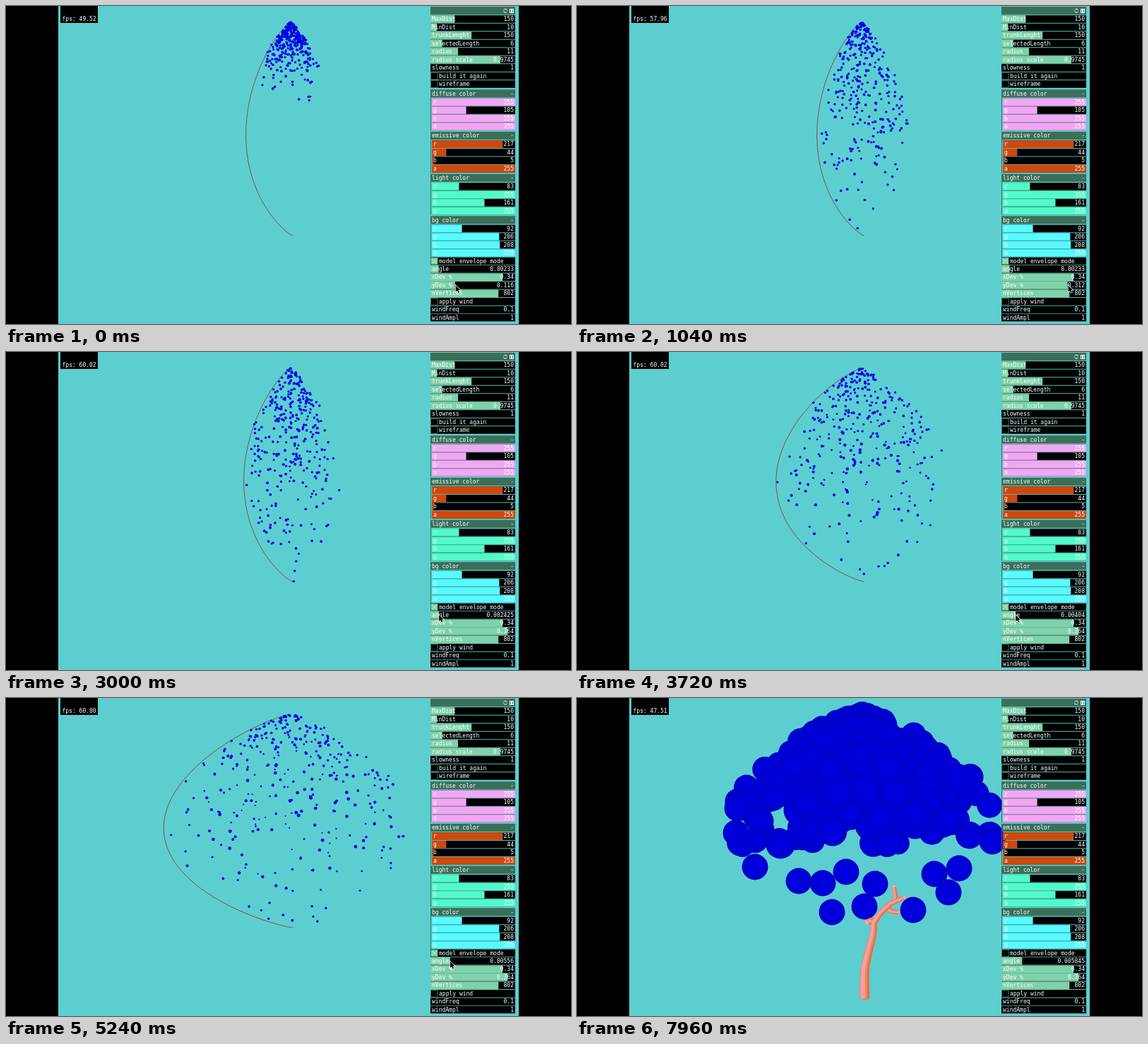
An HTML page with a canvas for the animation above (8000 ms loop, 800x450 px).

```html
<!DOCTYPE html>
<html lang="en">
<head>
<meta charset="utf-8">
<title>Tree generator</title>
<style>
  html, body { margin: 0; width: 100%; height: 100%; overflow: hidden; background: #000; }
  canvas { display: block; width: 800px; height: 450px; }
</style>
</head>
<body>
<canvas id="stage" width="800" height="450"></canvas>
<script>
const ctx = document.getElementById('stage').getContext('2d');
const LOOP = 8000, BUILD = 6420, GROWTH = .117, TAU = Math.PI * 2;
const SKY = '#5cced0', GREEN = '#80d0a8', HEADER = '#3c6f58';
const FONT = '8px "DejaVu Sans Mono", monospace';

// Piecewise linear interpolation over [time, value] stops.
function lerpStops(t, stops) {
  const i = stops.findIndex(([time]) => t <= time);
  if (i === 0) return stops[0][1];
  if (i < 0) return stops[stops.length - 1][1];
  const [t0, v0] = stops[i - 1], [t1, v1] = stops[i];
  return v0 + (v1 - v0) * (t - t0) / (t1 - t0);
}

function seeded(seed) {
  let s = seed * 7919 + 12345 | 0;
  return () => {
    s = s + 0x6D2B79F5 | 0;
    let n = Math.imul(s ^ s >>> 15, 1 | s);
    n = n + Math.imul(n ^ n >>> 7, 61 | n) ^ n;
    return ((n ^ n >>> 14) >>> 0) / 4294967296;
  };
}

function disc(x, y, r) {
  ctx.beginPath();
  ctx.arc(x, y, r, 0, TAU);
  ctx.fill();
}

function rect(x, y, w, h, color) {
  ctx.fillStyle = color;
  ctx.fillRect(x, y, w, h);
}

function text(str, x, y, align = 'left') {
  ctx.fillStyle = '#fff';
  ctx.font = FONT;
  ctx.textAlign = align;
  ctx.fillText(str, x, y);
}

// ---- slider motion ----
const Y_DEV = [[0, .116], [1040, .312], [2040, .362], [2250, .364]];
const ANGLE_STEPS = [[2950, 0], [3720, 18], [5240, 34], [5640, 37]];
const FPS = [[0, 49.52], [1040, 57.96], [2040, 60.01], [3720, 60.02],
             [5240, 60], [6600, 59.98], [7960, 47.51]];

function stateAt(t) {
  const yStep = Math.round(lerpStops(t, Y_DEV) / .002);
  const aStep = Math.round(lerpStops(t, ANGLE_STEPS));
  return {
    seed: yStep * 101 + aStep,
    yDev: yStep * .002,
    angle: .00233 + aStep * .000095,
    fps: lerpStops(Math.floor(t / 40) * 40, FPS),
    envelope: t < BUILD - 40
  };
}

// ---- envelope: a curve from u = 0 (top) to u = 1 (bottom), and points inside its revolution ----
const heightAt = u => 23 + u * 346 - u * u * 44;
const axisAt = u => 403 + u * 3.5;
const halfWidth = (u, angle) =>
  angle * (24480 + 1.468e6 * angle) * Math.pow(4 * u * (1 - u), .8);

function scatter({ seed, yDev, angle }, count, limit = 1) {
  const rnd = seeded(seed), points = [];
  const gauss = () => Math.sqrt(-2 * Math.log(1 - rnd())) * Math.cos(TAU * rnd());
  while (points.length < count) {
    const u = Math.abs(gauss()) * yDev * 1.05;
    if (u > limit) continue;
    const r = halfWidth(u, angle) * Math.max(0, 1 - Math.abs(gauss()) * .34);
    const a = rnd() * TAU;
    points.push({ x: axisAt(u) + r * Math.cos(a), y: heightAt(u), z: r * Math.sin(a) });
  }
  return points;
}

function drawEnvelope(state) {
  ctx.strokeStyle = '#8a4a48';
  ctx.lineWidth = 1;
  ctx.beginPath();
  for (let i = 0; i <= 100; i++) {
    const u = (1 - Math.cos(Math.PI * i / 100)) / 2;
    ctx.lineTo(axisAt(u) - halfWidth(u, state.angle), heightAt(u));
  }
  ctx.stroke();
  ctx.fillStyle = '#0000e6';
  for (const { x, y, z } of scatter(state, 345)) disc(x, y, 1.7 * (1 + z / 380));
}

// ---- foliage: a scattered crown and a few loose leaves below it ----
const LOOSE = [[227, 156], [225, 191], [252, 239], [314, 259], [348, 262], [361, 303],
               [381, 246], [407, 295], [422, 263], [476, 300], [506, 249], [526, 275],
               [541, 241], [588, 203]];
const REACHED = [[407, 320], [440, 308]];
const crown = scatter({ seed: 11, yDev: .364, angle: .005845 }, 320, .58)
  .sort((a, b) => a.z - b.z);

function leaf(x, y, r) {
  const g = ctx.createRadialGradient(x, y, r * .6, x, y, r);
  g.addColorStop(0, '#0000dc');
  g.addColorStop(1, '#0000c6');
  ctx.fillStyle = g;
  disc(x, y, r);
}

function drawLeaves(t) {
  const treeTop = 424 - (t - BUILD) * GROWTH;
  for (const [x, y] of REACHED) if (y < treeTop) leaf(x, y, 16);
  for (const { x, y, z } of crown) leaf(x, y, 18 * (1 + z / 800));
  for (const [x, y] of LOOSE) leaf(x, y, 18.5);
}

// ---- trunk and branches: [distance at which growth starts, points] ----
const BRANCHES = [
  [112, [[421, 317], [416, 315], [410, 318]]],
  [143, [[440, 295], [444, 302], [456, 303]]],
  [146, [[450, 290], [451, 280], [449, 266]]],
  [0, [[407.5, 424], [407, 402], [408, 380], [414, 355], [419, 336], [421, 317],
       [430, 304], [444, 291], [464, 282]]]
];
// Bark layers from shaded edge to lit side: [sideways shift, width, color].
const BARK = [[0, 1, '#e9703f'], [-.11, .78, '#f28468'], [-.2, .5, '#f3a0a0']];

function walk(points, length, visit) {
  let walked = 0;
  for (let i = 1; i < points.length && walked < length; i++) {
    const [x0, y0] = points[i - 1], [x1, y1] = points[i];
    const len = Math.hypot(x1 - x0, y1 - y0), dir = Math.atan2(y1 - y0, x1 - x0);
    for (let d = 0; d < Math.min(len, length - walked); d += .8)
      visit(x0 + (x1 - x0) * d / len, y0 + (y1 - y0) * d / len, dir, walked + d);
    walked += len;
  }
}

function ring(x, y, dir, w, color) {
  ctx.fillStyle = color;
  ctx.beginPath();
  ctx.ellipse(x, y, w * .2, w / 2, dir, 0, TAU);
  ctx.fill();
}

function drawTree(t) {
  const grown = (t - BUILD) * GROWTH;
  for (const [start, points] of BRANCHES) {
    let tip;
    for (const [shift, scale, color] of BARK) {
      walk(points, grown - start, (x, y, dir, d) => {
        const w = 14 - (start + d) * .048;
        ring(x + w * shift, y, dir, w * scale, color);
        tip = [x, y, dir, w];
      });
    }
    if (tip) ring(...tip, '#f7a9ae');
  }
}

// ---- control panel ----
const PX = 601, PW = 120, ROW = 11.5;

function bar(y, label, value, fill, color = GREEN, x = PX) {
  const w = PX + PW - x;
  rect(x, y - 5.3, w, 10.6, '#000');
  rect(x, y - 5.3, w * fill, 10.6, color);
  text(label, x + 2, y + 2.6);
  text(value, 719, y + 2.6, 'right');
}

function toggle(y, label, on) {
  rect(PX, y - 5.3, PW, 10.6, '#000');
  ctx.strokeStyle = HEADER;
  ctx.lineWidth = 1;
  ctx.strokeRect(PX + .5, y - 4.8, 9.5, 9.6);
  if (on) {
    rect(PX + 1, y - 4.5, 9, 9, GREEN);
    ctx.strokeStyle = '#d4eebc';
    ctx.beginPath();
    for (const side of [-1, 1]) {
      ctx.moveTo(PX + 5.5 - 3.5 * side, y - 3.5);
      ctx.lineTo(PX + 5.5 + 3.5 * side, y + 3.5);
    }
    ctx.stroke();
  }
  text(label, 613, y + 2.6);
}

function colorGroup(y, title, color, values) {
  rect(PX, y - 5.8, PW, 11.2, HEADER);
  text(title, 603, y + 2.6);
  text('-', 719, y + 2.6, 'right');
  rect(PX, y + 5.4, 1, 47, HEADER);
  values.forEach((v, i) => bar(y + 12 + i * ROW, 'rgba'[i], v, v / 255, color, 603));
}

function drawPanel(s) {
  rect(PX, 1, PW, 11.2, HEADER);
  ctx.strokeStyle = '#fff';
  ctx.lineWidth = 1;
  ctx.beginPath();
  ctx.arc(707, 6.7, 2.5, .5, 2.9);
  ctx.moveTo(704.6, 5.5);
  ctx.arc(707, 6.7, 2.5, 3.6, 6);
  ctx.stroke();
  ctx.strokeRect(713.5, 4.5, 5, 5);
  rect(715, 5, 2, 4, '#fff');

  [['MaxDist', '150', .285], ['MinDist', '10', .075], ['trunkLenght', '150', .485],
   ['selectedLength', '6', .14], ['radius', '11', .325], ['radius scale', '0.9745', .825],
   ['slowness', '1', 0]].forEach((row, i) => bar(18.5 + i * ROW, ...row));
  toggle(99, 'build it again', false);
  toggle(110.5, 'wireframe', false);

  colorGroup(124, 'diffuse color', '#f3a6f3', [255, 105, 255, 255]);
  colorGroup(183.7, 'emissive color', '#d0480c', [217, 44, 5, 255]);
  colorGroup(243.4, 'light color', '#53fac9', [83, 255, 161, 255]);
  colorGroup(303, 'bg color', '#58faff', [92, 206, 208, 255]);

  toggle(361, 'model envelope mode', s.envelope);
  [['angle', String(+s.angle.toFixed(6)), s.angle * 41.8],
   ['xDev %', '0.34', .85],
   ['yDev %', String(+s.yDev.toFixed(3)), s.yDev / .4],
   ['nVertices', '802', .802]].forEach((row, i) => bar(372.3 + i * ROW, ...row));
  toggle(418.3, 'apply wind', false);
  bar(429.8, 'windFreq', '0.1', 0);
  bar(441, 'windAmpl', '1', 0);
}

// ---- pointer: drags yDev, then angle, then clicks the envelope toggle ----
function drawPointer(t, s) {
  if (t > 7300) return;
  const yDevX = PX + s.yDev * 300 + 1, angleX = PX + s.angle * 5016;
  const x = t < 2950
    ? lerpStops(t, [[2400, yDevX], [2850, 613]])
    : lerpStops(t, [[5800, angleX], [6250, 608]]);
  const y = lerpStops(t, [[2400, 395.5], [2850, 372], [5800, 373], [6250, 362]]);
  ctx.beginPath();
  [[0, 0], [0, 9], [2.1, 7.2], [3.6, 10.4], [5.2, 9.7], [3.8, 6.6], [6.5, 6.4]]
    .forEach(([dx, dy]) => ctx.lineTo(x + dx, y + dy));
  ctx.closePath();
  ctx.lineWidth = 1.4;
  ctx.strokeStyle = '#fff';
  ctx.stroke();
  ctx.fillStyle = '#000';
  ctx.fill();
}

function draw(t) {
  const s = stateAt(t);
  rect(0, 0, 800, 450, '#000');
  rect(74, 0, 652, 450, SKY);
  if (s.envelope) {
    drawEnvelope(s);
  } else {
    drawLeaves(t);
    drawTree(t);
  }
  rect(77, 0, 53, 24, '#000');
  text('fps: ' + s.fps.toFixed(2), 79.5, 20.5);
  drawPanel(s);
  drawPointer(t, s);
}

function tick() {
  draw(performance.now() % LOOP);
  requestAnimationFrame(tick);
}
tick();
</script>
</body>
</html>
```
